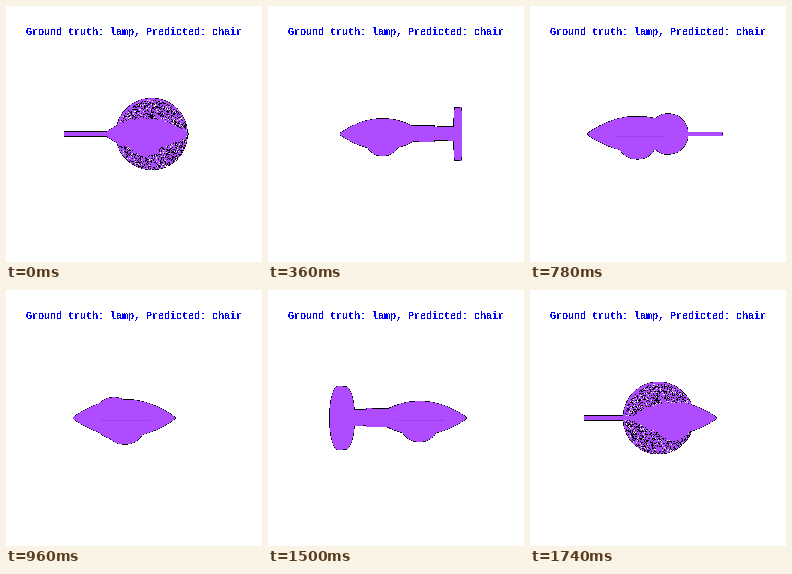
These frames come from a looping animation (256x256 px, 1800 ms). A matplotlib script:

```python
import numpy as np
import matplotlib.pyplot as plt
from matplotlib.animation import FuncAnimation

SIZE, DPI = 256, 100
FRAMES, STEP = 30, 60
DIST = 221.7  # camera distance, 60 degree field of view
INSET = 0.8   # room for the outline
PURPLE, SEAM = "#b04cff", "#8a3cd0"
PX = 72 / DPI

plt.rcParams["text.antialiased"] = False
rng = np.random.default_rng(4)


def revolve(axis, center, offsets, radii, n=72):
    """Surface points of a solid of revolution around one axis."""
    a = np.linspace(0, 2 * np.pi, n, endpoint=False)
    t = np.repeat(offsets, n)
    r = np.repeat(radii, n)
    u, v = r * np.tile(np.cos(a), len(offsets)), r * np.tile(np.sin(a), len(offsets))
    pts = np.insert(np.column_stack([u, v]), axis, t, axis=1)
    return pts + np.array(center)


def project(pts, angle):
    c, s = np.cos(angle), np.sin(angle)
    x, y, z = pts.T
    depth = z * c - x * s
    k = DIST / (DIST - depth)
    return np.column_stack([128 + (x * c + z * s) * k, 128 + y * k])


dirs = np.linspace(0, 2 * np.pi, 360, endpoint=False)
dirs = np.array([np.cos(dirs), np.sin(dirs)])


def outline(pts):
    """Convex outline: the farthest point in every direction, pulled in a little."""
    return pts[np.argmax(pts @ dirs, axis=0)] - INSET * dirs.T


CX, SHADE_Z = 12.7, -19.2
h = np.linspace(-1, 1, 41)
shade_r = 45 * np.sqrt(1 - np.abs(h))
parts = [
    revolve(2, (CX, 0, 0), [56.5, 62.5], [25.8, 25.8]),               # plate
    revolve(0, (0, 0, 40), [-56.8, CX], [2.2, 2.2]),                  # rod
    revolve(2, (CX, -0.3, 0), [SHADE_Z, 36], [8.3, 8.3]),             # stem
    revolve(2, (CX, -0.3, 0), [36, 57], [7, 7]),
    revolve(1, (CX, 0, SHADE_Z), h * 16 + np.sign(h) * 0.8, shade_r),  # shade
    revolve(1, (CX, 5, SHADE_Z), 19 * h, 19 * np.sqrt(1 - h * h)),     # bulb
]

N = 1900
rad, phi = 25 * np.sqrt(rng.random(N)), 2 * np.pi * rng.random(N)
gaps = np.column_stack([CX + rad * np.cos(phi), rad * np.sin(phi), np.full(N, 62.5)])
is_white = rng.random(N) < 0.14

fig = plt.figure(figsize=(SIZE / DPI, SIZE / DPI), dpi=DPI, facecolor="white")
ax = fig.add_axes([0, 0, 1, 1])
ax.set(xlim=(0, SIZE), ylim=(SIZE, 0))
ax.axis("off")
for x in (19.5, 20.5):  # struck twice for a heavier weight
    ax.text(x, 29, "Ground truth: lamp, Predicted: chair", color="#0000ff",
            family="Liberation Mono", weight="bold", size=10 * PX, va="baseline")


def polygon(z, **style):
    return ax.add_patch(plt.Polygon(np.zeros((3, 2)), zorder=z, antialiased=False, **style))


edges = [polygon(1, fill=False, ec="black", lw=PX, ls=(0, (1, 1))) for _ in parts]
fills = [polygon(2 if i == 0 else 4, fc=PURPLE, lw=0) for i in range(len(parts))]


def dots(color, z):
    return ax.plot([], [], ls="", marker="s", ms=PX, mew=0, color=color,
                   antialiased=False, zorder=z)[0]


black, white, seam = dots("black", 3), dots("white", 3), dots(SEAM, 5)


def draw(i):
    angle = 2 * np.pi * i / FRAMES
    for pts, edge, fill in zip(parts, edges, fills):
        xy = outline(project(pts, angle))
        edge.set_xy(xy)
        fill.set_xy(xy)

    # gaps open up in the plate as it comes close and faces the viewer
    c, s = np.cos(angle), np.sin(angle)
    depth = 60 * c - CX * s
    view = np.arctan2(CX * c + 60 * s, DIST - depth)
    spread = np.cos(angle + view) * (DIST / (DIST - depth) / 1.36) ** 2
    count = int(N * np.clip((spread - 0.4) / 0.5, 0, 1))
    xy = np.floor(project(gaps[:count], angle)) + 0.5
    w = is_white[:count]
    black.set_data(*xy[~w].T)
    white.set_data(*xy[w].T)

    # faint seam along the shade when it is near
    mid = project(np.array([[CX, 0, SHADE_Z]]), angle)[0, 0]
    near = SHADE_Z * c - CX * s > -10
    x = np.floor(mid) + np.arange(-24, 25, 2) + 0.5
    seam.set_data(x if near else [], np.full(len(x), 129.5) if near else [])
    return [*edges, *fills, black, white, seam]


anim = FuncAnimation(fig, draw, frames=FRAMES, interval=STEP, repeat=True, repeat_delay=0)
plt.show()
```
